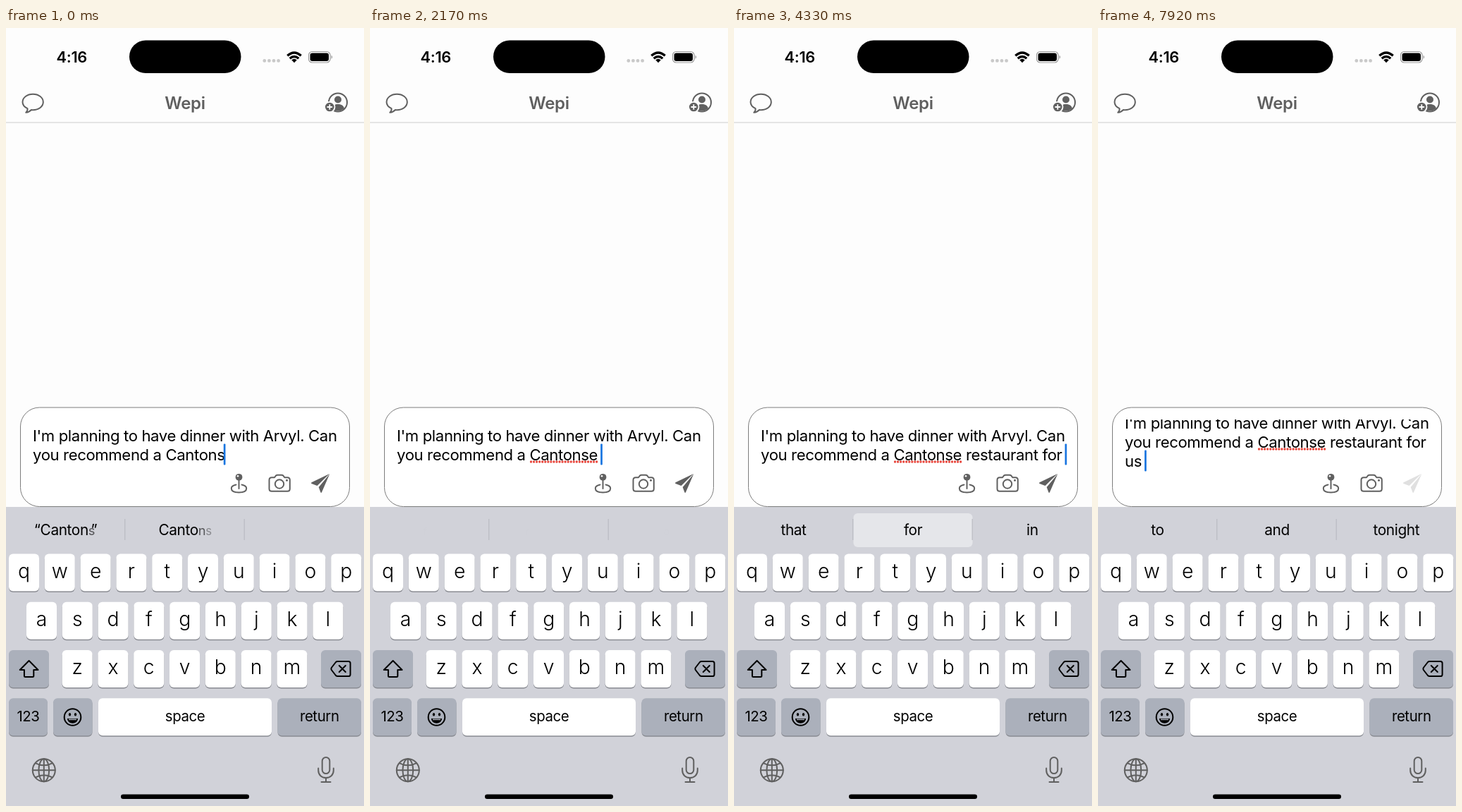
Write an HTML page that moves like this. It is 508 px wide and 1103 px high and loops after 8 s.

```html
<!DOCTYPE html>
<html lang="en">
<head>
<meta charset="utf-8">
<title>Chat message typing</title>
<style>
  html, body { margin: 0; width: 100%; height: 100%; overflow: hidden; background: #fdfdfd; }
  svg { display: block; width: 100vw; height: 100vh; }
  text { font-family: Inter, "Open Sans", sans-serif; white-space: pre; fill: #000; }
  .mid { text-anchor: middle; }
  .msg { font-size: 22.14px; letter-spacing: -0.375px; }
  .cell { font-size: 20.84px; letter-spacing: -0.4px; text-anchor: middle; }
  .key { font-size: 28.3px; font-weight: 350; text-anchor: middle; }
  .label { font-size: 20.4px; letter-spacing: -0.4px; text-anchor: middle; }
  .line { fill: none; stroke: #606060; stroke-width: 2; stroke-linecap: round; stroke-linejoin: round; }
  .ink { stroke: #000; }
  .solid { fill: #606060; }
</style>
</head>
<body>
<svg viewBox="0 0 508 1103" preserveAspectRatio="none">
  <defs><clipPath id="field"><rect x="22" y="555" width="464" height="80"/></clipPath></defs>
  <rect width="508" height="1103" fill="#fdfdfd"/>

  <!-- status bar -->
  <text x="93.3" y="49" class="mid" font-size="21.8" font-weight="600" letter-spacing="-.3">4:16</text>
  <rect x="175" y="17.5" width="158.5" height="46.5" rx="23.2"/>
  <g fill="#c9c9c9">
    <circle cx="366.8" cy="46.4" r="2.4"/><circle cx="373.4" cy="46.4" r="2.4"/>
    <circle cx="380" cy="46.4" r="2.4"/><circle cx="386.6" cy="46.4" r="2.4"/>
  </g>
  <g fill="none" stroke="#000" stroke-width="3.4">
    <path d="M399.3 39.2Q409 30.6 418.7 39.2"/><path d="M402.7 43.2Q409 37.6 415.3 43.2"/>
  </g>
  <path d="M405.2 45.2Q409 42.2 412.8 45.2L409 49.2Z"/>
  <rect x="429.5" y="33.5" width="30.5" height="15.5" rx="5" fill="none" stroke="#9a9a9a" stroke-width="1.2"/>
  <rect x="431.5" y="35.5" width="26.5" height="11.5" rx="3.2"/>
  <path d="M461.6 38.6Q464.6 41.2 461.6 43.9Z" fill="#9a9a9a"/>

  <!-- header -->
  <path class="line" d="M30.5 114.2C26 112 23.5 108.8 23.5 105C23.5 98.8 30 93.8 38.2 93.8S52.8 98.8 52.8 105S46.4 116.2 38.2 116.2Q37 116.2 36 116Q33 119.3 28.3 119.8Q31 117.5 30.5 114.2Z"/>
  <text x="254" y="114.5" class="mid" font-size="24" font-weight="600" letter-spacing="-.3" style="fill:#5f5f5f">Wepi</text>
  <circle class="line" cx="471" cy="105.5" r="13"/>
  <circle class="solid" cx="471" cy="101.5" r="5"/>
  <path class="solid" d="M462 114C463 109.5 467 108 471 108S479 109.5 480 114Q476 117.5 471 117.5T462 114Z"/>
  <circle cx="459.3" cy="112" r="7.2" fill="#606060" stroke="#fdfdfd" stroke-width="1.8"/>
  <path d="M455.5 112H463.1M459.3 108.2V115.8" stroke="#fff" stroke-width="1.8"/>
  <path d="M0 134H508" stroke="#cdcdcd" stroke-width="1.2"/>

  <!-- message field -->
  <rect x="20.5" y="538" width="467" height="140.5" rx="27" fill="#fff" stroke="#7c7c7c"/>
  <g clip-path="url(#field)">
    <g id="message">
      <text class="msg" x="38" y="586">I'm planning to have dinner with Arvyl. Can</text>
      <text class="msg" x="38" y="613" id="second"></text>
      <text class="msg" x="38" y="640" id="third"></text>
      <path id="squiggle" stroke="#e8463c" stroke-width="3.3" stroke-linecap="round" stroke-dasharray="0 4.05"/>
      <rect id="caret" width="2.7" height="30" rx="1" fill="#1875e0"/>
    </g>
  </g>
  <circle class="solid" cx="330.5" cy="636.8" r="4.9"/>
  <circle cx="329" cy="635.2" r="1.3" fill="#fff"/>
  <path class="line" d="M330.5 640V653M326.500 647.5C321.5 648.5 319.8 650.5 319.8 652.800C319.8 656.300 324 658.500 330.5 658.500S341.200 656.300 341.200 652.800C341.200 650.500 339.500 648.500 334.500 647.500"/>
  <path class="line" stroke-width="1.800" d="M377 637.200H381L383 634.600Q384 633.700 385.300 633.700H391Q392.300 633.700 393.300 634.600L395.300 637.200H399.300Q402.800 637.200 402.800 640.700V653.200Q402.800 656.700 399.300 656.700H377Q373.500 656.700 373.500 653.200V640.700Q373.500 637.200 377 637.200Z"/>
  <circle class="line" cx="388" cy="646.500" r="6.200"/>
  <circle class="solid" cx="398.500" cy="641.300" r="1.500"/>
  <path id="send" d="M459 632L433.500 644.200Q432.300 645.200 433.700 646L441.600 648.900ZM459.300 632.300L443.700 651L446.400 658.300Q447.200 659.500 448 658.300Z"/>

  <!-- keyboard -->
  <rect y="679" width="508" height="424" fill="#d1d2d9"/>
  <rect id="tap" y="688" width="169" height="48" rx="6" fill="#e5e6ea"/>
  <path d="M168.700 696V726M338.200 696V726" stroke="#babbc2" stroke-width="1.200"/>
  <text class="cell" x="84.500" y="719"></text>
  <text class="cell" x="254" y="719"></text>
  <text class="cell" x="423.300" y="719"></text>
  <g id="keys"></g>
  <path class="line ink" d="M32.600 897L45.500 910H39.300V918.500Q39.300 920 37.800 920H27.400Q25.900 920 25.900 918.500V910H19.700Z"/>
  <path class="line ink" d="M470.500 898H486Q488.600 898 488.600 900.600V916.400Q488.600 919 486 919H470.500Q469 919 468 918L461.800 910Q461 908.500 461.800 907L468 899Q469 898 470.500 898ZM472.800 904L481.800 913M481.800 904L472.800 913"/>
  <circle class="line ink" cx="94.500" cy="977" r="11.800"/>
  <ellipse cx="90.500" cy="973.300" rx="1.600" ry="2.200"/><ellipse cx="98.500" cy="973.300" rx="1.600" ry="2.200"/>
  <path d="M86.800 979H102.200Q101 985.800 94.500 985.800T86.800 979Z"/>
  <path d="M89 980.400H100" stroke="#abb0bb" stroke-width="1.500"/>
  <g class="line">
    <circle cx="53.800" cy="1052.300" r="16"/><ellipse cx="53.800" cy="1052.300" rx="7.400" ry="16"/>
    <path d="M53.800 1036.300V1068.300M37.800 1052.300H69.800M42 1042.300Q53.800 1048.300 65.600 1042.300M42 1062.300Q53.800 1056.300 65.600 1062.300"/>
    <rect x="448.700" y="1034" width="10.600" height="23" rx="5.300"/>
    <path d="M443.200 1049.500V1052.500C443.200 1059 448 1063 454 1063S464.800 1059 464.800 1052.500V1049.500M454 1063V1069M447.500 1069H460.500"/>
  </g>
  <rect x="163" y="1086.500" width="182" height="6.500" rx="3.250"/>
</svg>
<script>
const LOOP = 8000;
const $ = id => document.getElementById(id);
const clamp = v => Math.max(0, Math.min(1, v));
const ramp = (t, from, to) => clamp((t - from) / (to - from));

const lead = "you recommend a ";
const firstCells = ["“Canton”", "Canto", ""];
// Each edit: time, second line, third line, next suggestions, tapped suggestion
const edits = [
  { at: -160, line: "Cantons", cells: ["“Cantons”", "Cantons", ""] },
  { at: 580, line: "Cantonse", cells: ["“Cantonse”", "Cantonese", ""] },
  { at: 2080, line: "Cantonse ", cells: ["for", "restaurant", "or"] },
  { at: 3400, line: "Cantonse restaurant ", cells: ["that", "for", "in"], tap: 1 },
  { at: 4320, line: "Cantonse restaurant for ", cells: ["dinner", "me", "us"], tap: 1 },
  { at: 5580, line: "Cantonse restaurant for ", third: "us ", cells: ["to", "and", "tonight"], tap: 2 },
];

function addKey(x, y, width, text, style = "key", fill = "#fff", id = "") {
  const baseline = y + (style === "key" ? 34 : 33);
  $("keys").insertAdjacentHTML("beforeend",
    `<rect x="${x}" y="${y + 1.5}" width="${width}" height="53" rx="6" fill="#898b92"/>
     <rect x="${x}" y="${y}" width="${width}" height="53" rx="6" fill="${fill}" id="${id}"/>
     <text class="${style}" x="${x + width / 2}" y="${baseline}">${text}</text>`);
}
const grey = "#abb0bb";
[["qwertyuiop", 4], ["asdfghjkl", 29], ["zxcvbnm", 79.6]].forEach(([letters, left], row) =>
  [...letters].forEach((c, i) => addKey(left + i * 50.8, 745.5 + row * 68.2, 43, c)));
addKey(4, 882, 57, "", "label", grey);
addKey(447, 882, 57, "", "label", grey);
addKey(4, 950.3, 55, "123", "label", grey);
addKey(67, 950.3, 55.5, "", "label", grey);
addKey(131, 950.3, 246, "space", "label", "#fff", "space");
addKey(385.5, 950.3, 118.5, "return", "label", grey);

// New letters grow in one after another; shared ends of the word stay.
function reveal(from, to, age) {
  const shortest = Math.min(from.length, to.length);
  let head = 0, tail = 0, pull = 0;
  while (head < shortest && from[head] === to[head]) head++;
  while (tail < shortest - head && from.at(-1 - tail) === to.at(-1 - tail)) tail++;
  return [...to].map((c, i) => {
    if (i < head) return c;
    if (i >= to.length - tail) {
      const shift = pull;
      pull = 0;
      return `<tspan dx="${-shift}">${c}</tspan>`;
    }
    const p = clamp((age - (i - head) * 30) / 120);
    pull = (1 - p) * 14;
    return `<tspan fill-opacity="${p}" font-size="${20.84 * (0.7 + 0.3 * p)}">${c}</tspan>`;
  }).join("");
}

// The caret blinks once a second, counted from the last edit.
function caretAlpha(age) {
  const p = age % 1000;
  return p < 850 ? 1 - ramp(p, 580, 670) : ramp(p, 850, 1000);
}

const cellTexts = document.querySelectorAll(".cell");
const hardSpace = s => s.replace(/ $/, "\u00a0");

function draw(t) {
  const index = edits.findLastIndex(e => t >= e.at);
  const edit = edits[index];
  const second = $("second"), third = $("third");
  second.textContent = hardSpace(lead + edit.line);
  third.textContent = hardSpace(edit.third || "");

  const scroll = edit.third ? 1 - (1 - ramp(t, edit.at, edit.at + 250)) ** 3 : 0;
  $("message").setAttribute("transform", `translate(0 ${-18 * scroll})`);

  const active = edit.third ? third : second;
  const caret = $("caret");
  caret.setAttribute("x", 38 + active.getComputedTextLength() - 1.8);
  caret.setAttribute("y", edit.third ? 616.5 : 589.5);
  caret.setAttribute("opacity", caretAlpha(t - edit.at));

  const wordStart = 38 + second.getSubStringLength(0, lead.length);
  const wordEnd = wordStart + second.getSubStringLength(lead.length, Math.min(8, edit.line.length));
  $("squiggle").setAttribute("d", index > 1 ? `M${wordStart + 2} 615H${wordEnd - 1}` : "");

  const shown = t >= edit.at + 90 ? index : index - 1;
  const before = shown > 0 ? edits[shown - 1].cells : firstCells;
  cellTexts.forEach((el, i) => {
    el.innerHTML = reveal(before[i], edits[shown].cells[i], t - edits[shown].at - 90);
  });

  const tapped = edits.find(e => e.tap && t >= e.at - 80 && t < e.at + 90);
  $("tap").setAttribute("opacity", tapped ? 1 : 0);
  if (tapped) $("tap").setAttribute("x", tapped.tap * 169.5);

  $("space").setAttribute("fill", t >= 1990 && t < 2090 ? grey : "#fff");
  $("send").setAttribute("fill", t >= 7900 ? "#e0e0e0" : "#606060");
}

const start = performance.now();
function tick() {
  draw((performance.now() - start) % LOOP);
  requestAnimationFrame(tick);
}
tick();
</script>
</body>
</html>
```
